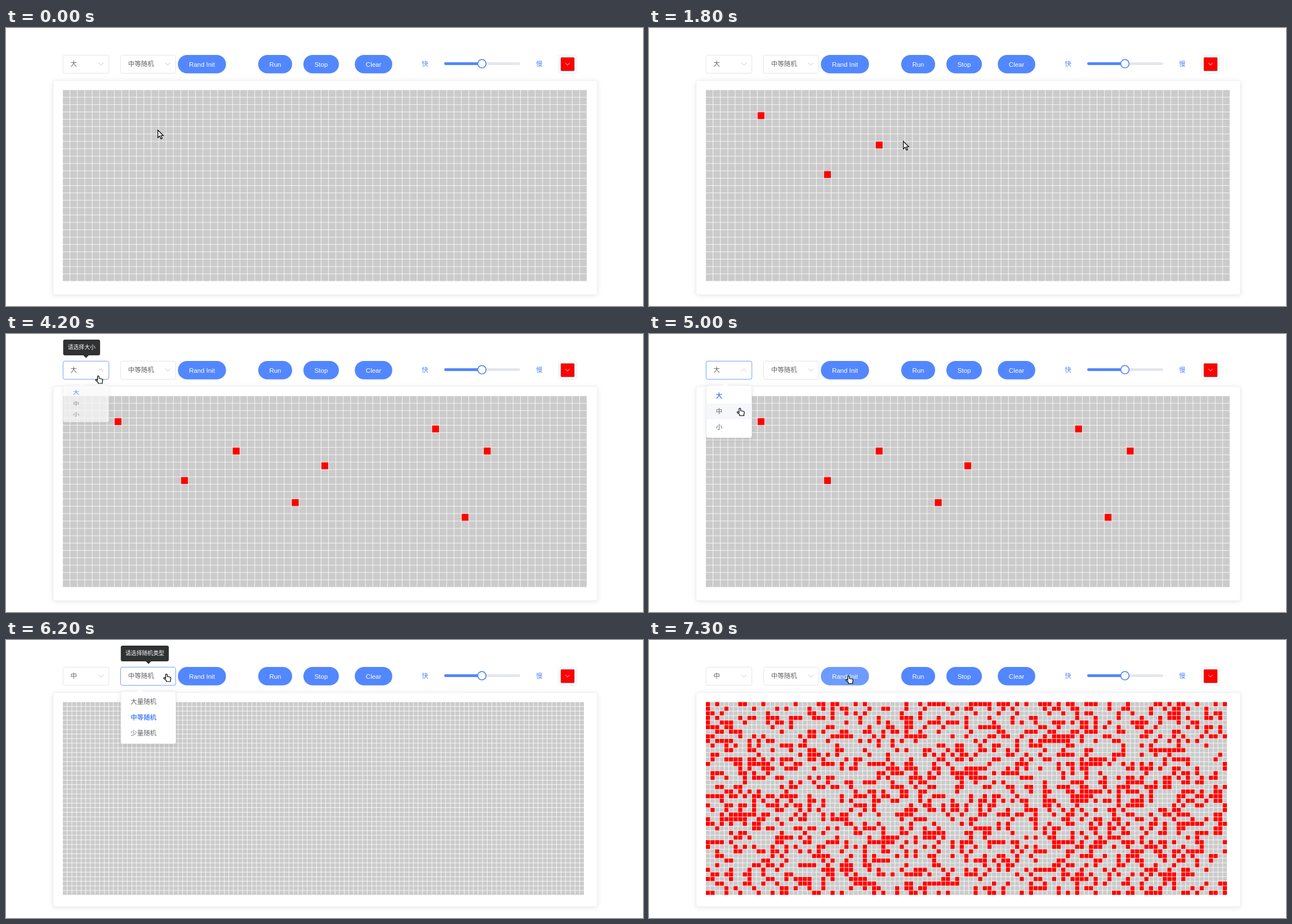
An HTML page with a canvas for the animation above (8000 ms loop, 1131x495 px).

```html
<!DOCTYPE html>
<html lang="zh-CN">
<head>
<meta charset="utf-8">
<style>
html, body { margin: 0; width: 100%; height: 100%; overflow: hidden; background: #fff; }
canvas { display: block; }
</style>
</head>
<body>
<canvas id="stage" width="1131" height="495"></canvas>
<script>
const ctx = document.getElementById('stage').getContext('2d');
const LOOP = 8000, FRAME = 100, UNIT = 0.8194;
const LEFT = 101, TOP = 110.5, BIG = 16 * UNIT, SMALL = 10 * UNIT;
const BLUE = '#5287ff', HOVER = '#6e9bff', ACTIVE = '#4a7ae6';
const BORDER = '#dcdfe6', TEXT = '#606266', RED = '#ff0000', CELL = '#cbcbcb';
const FONT = '"Liberation Sans", "Noto Sans CJK SC", "Noto Sans CJK", sans-serif';
const SIZES = ['大', '中', '小'];
const AMOUNTS = ['大量随机', '中等随机', '少量随机'];
const ARROW = new Path2D('M.6 .8V14.3L3.8 11.3L6.1 16.4L8.3 15.4L6.1 10.5H10.3Z');
const HAND = new Path2D('M4.4 8.5V2a1.4 1.4 0 0 1 2.8 0V5L12 6q2 .5 1.8 2.5L13 11.3V14H5.6V12L1.2 8.6q-.7-1.7 1-1.8z');

// Pointer legs; a clicking leg turns on the cell where it ends
const leg = (start, end, x, y, click) => ({ start, end, x, y, click });
const LEGS = [
  leg(0, 0, 269, 181),
  leg(100, 500, 220, 157),
  leg(600, 900, 199, 156, true),
  leg(1000, 1500, 320, 266, true),
  leg(1500, 1700, 411, 209, true),
  leg(1700, 1800, 451, 201),
  leg(1800, 2000, 514, 302, true),
  leg(2000, 2300, 568, 238, true),
  leg(2300, 2400, 616, 232),
  leg(3600, 3600, 763, 169, true),
  leg(3600, 3600, 855, 208, true),
  leg(3600, 3600, 815, 326, true),
  leg(3600, 3600, 244, 117),
  leg(3600, 3900, 158, 74),
  leg(4400, 4600, 155.5, 131.5),
  leg(5300, 5400, 245, 79),
  leg(5500, 5700, 279, 60),
  leg(6600, 6700, 348.5, 63.5)
];

function pointerAt(t) {
  let x = 0, y = 0;
  for (const l of LEGS) {
    if (t < l.start) break;
    const k = t >= l.end ? 1 : (t - l.start) / (l.end - l.start);
    x += (l.x - x) * k;
    y += (l.y - y) * k;
  }
  return [x, y];
}

const within = (t, start, end) => t >= start && t < end;

// Shown amount of a popup: part way while it appears and disappears
function shown(t, start, full, fade, gone) {
  if (!within(t, start, gone)) return 0;
  return t < full ? 0.7 : t < fade ? 1 : 0.56;
}

function clicked(t, c, r) {
  return LEGS.some(l => l.click && t >= l.end &&
    c === Math.floor((l.x - LEFT) / BIG) && r === Math.floor((l.y - TOP) / BIG));
}

function noise(c, r) {
  const s = Math.sin(c * 12.9898 + r * 78.233) * 43758.5453;
  return s - Math.floor(s);
}

function text(str, x, cy, color, { size = 14, align = 'left', weight = '' } = {}) {
  const px = size * UNIT;
  ctx.font = `${weight} ${px}px ${FONT}`;
  ctx.textAlign = align;
  ctx.fillStyle = color;
  ctx.fillText(str, x, cy + px * 0.375);
}

function box(x, y, w, h, r, fill, stroke) {
  ctx.beginPath();
  ctx.roundRect(x, y, w, h, r);
  if (fill) { ctx.fillStyle = fill; ctx.fill(); }
  if (stroke) { ctx.strokeStyle = stroke; ctx.lineWidth = UNIT; ctx.stroke(); }
}

function panel(x, y, w, h) {
  ctx.save();
  ctx.shadowColor = 'rgba(0,0,0,.1)';
  ctx.shadowBlur = 10;
  ctx.shadowOffsetY = 1.6;
  box(x, y, w, h, 3.3, '#fff');
  ctx.restore();
  box(x, y, w, h, 3.3, null, '#e7eaf1');
}

function triangle(x, y, dy, color) {
  ctx.fillStyle = color;
  ctx.beginPath();
  ctx.moveTo(x - 5, y);
  ctx.lineTo(x + 5, y);
  ctx.lineTo(x, y + dy);
  ctx.fill();
}

function chevron(x, y, turn, color, half = 4.4) {
  ctx.save();
  ctx.translate(x, y);
  ctx.rotate(turn * Math.PI);
  ctx.beginPath();
  ctx.moveTo(-half, -half / 2);
  ctx.lineTo(0, half / 2);
  ctx.lineTo(half, -half / 2);
  ctx.strokeStyle = color;
  ctx.lineWidth = 1;
  ctx.stroke();
  ctx.restore();
}

function select(x, w, label, focused, open) {
  box(x, 48.3, w, 32.4, 3.3, '#fff', focused ? BLUE : BORDER);
  text(label, x + 13.3, 64, TEXT);
  chevron(x + w - 14, 64, 1 + (1 - open) ** 2, '#c0c4cc');
}

function dropdown(x, w, options, chosen, hovered, open) {
  ctx.save();
  ctx.globalAlpha = open;
  ctx.translate(0, 91 * (1 - open));
  ctx.scale(1, open);
  panel(x, 91.5, w, 93.3);
  triangle(x + 34, 92, -5, '#fff');
  options.forEach((label, i) => {
    const row = 34 * UNIT, cy = 110 + i * row, on = i === chosen;
    if (i === hovered) { ctx.fillStyle = '#f5f7fa'; ctx.fillRect(x, cy - row / 2, w, row); }
    text(label, x + 17.2, cy, on ? BLUE : TEXT, { weight: on ? 'bold' : '' });
  });
  ctx.restore();
}

function tooltip(x, label, arrowX, alpha) {
  ctx.save();
  ctx.globalAlpha = alpha;
  box(x, 10, label.length * 12 * UNIT + 16.4, 28, 3.3, '#303133');
  triangle(arrowX, 37.8, 5, '#303133');
  text(label, x + 8.2, 23.3, '#fff', { size: 12 });
  ctx.restore();
}

function button(label, x, w, color = BLUE) {
  box(x, 48, w, 32.8, 16.4, color);
  text(label, x + w / 2, 64.2, '#fff', { align: 'center' });
}

function slider() {
  text('快', 738.3, 64, BLUE);
  text('慢', 941, 64, BLUE);
  box(778, 61.1, 135, 4.9, 2.5, '#e4e7ed');
  box(778, 61.1, 67, 4.9, 2.5, BLUE);
  ctx.beginPath();
  ctx.arc(845, 63.6, 7.4, 0, 7);
  ctx.fillStyle = '#fff';
  ctx.fill();
  ctx.strokeStyle = BLUE;
  ctx.lineWidth = 1.7;
  ctx.stroke();
}

function colorPicker() {
  box(981.2, 48.3, 32.2, 32.2, 3.3, '#fff', '#e6e6e6');
  box(985, 52.3, 24.2, 24.2, 1.5, RED, '#999');
  chevron(997, 64.2, 0, 'rgba(255,255,255,.85)', 3.8);
}

function grid(cols, rows, pitch, isAlive) {
  const side = pitch - UNIT;
  for (let r = 0; r < rows; r++) for (let c = 0; c < cols; c++) {
    ctx.fillStyle = isAlive(c, r) ? RED : CELL;
    ctx.fillRect(LEFT + c * pitch, TOP + r * pitch, side, side);
  }
}

function pointer(t) {
  const shape = t < 3900 ? ARROW : HAND;
  ctx.save();
  ctx.translate(...pointerAt(t));
  ctx.fillStyle = '#fff';
  ctx.fill(shape);
  ctx.strokeStyle = '#000';
  ctx.lineWidth = 1.2;
  ctx.stroke(shape);
  ctx.restore();
}

function draw(t) {
  const resized = t >= 5200;
  const size = resized ? 1 : 0;
  const sizeOpen = shown(t, 4200, 4500, 5200, 5400);
  const amountOpen = shown(t, 5900, 6000, 6400, 6500);
  const initColor = t < 6700 ? BLUE : within(t, 7100, 7300) ? ACTIVE : HOVER;

  ctx.fillStyle = '#fff';
  ctx.fillRect(0, 0, 1131, 495);
  select(101.3, 81.4, SIZES[size], within(t, 4200, 5900), sizeOpen);
  select(203.5, 97.8, AMOUNTS[1], within(t, 5900, 7100), amountOpen);
  button('Rand Init', 305.2, 85.4, initColor);
  button('Run', 447.8, 60.2);
  button('Stop', 528, 63);
  button('Clear', 619.3, 66.5);
  slider();
  colorPicker();

  panel(83.6, 93.3, 966.4, 381.6);
  if (resized) grid(113, 42, SMALL, (c, r) => t >= 7300 && noise(c, r) < 0.36);
  else grid(71, 26, BIG, (c, r) => clicked(t, c, r));

  dropdown(101.6, 80.8, SIZES, size, t >= 4500 && !resized ? 1 : -1, sizeOpen);
  dropdown(204, 97.6, AMOUNTS, 1, -1, amountOpen);
  tooltip(101.5, '请选择大小', 142, shown(t, 4100, 4200, 4500, 4600));
  tooltip(203.8, '请选择随机类型', 253, shown(t, 5600, 5700, 6500, 6700));
  pointer(t);
}

function tick() {
  draw(Math.floor(performance.now() % LOOP / FRAME) * FRAME);
  requestAnimationFrame(tick);
}
tick();
</script>
</body>
</html>
```
